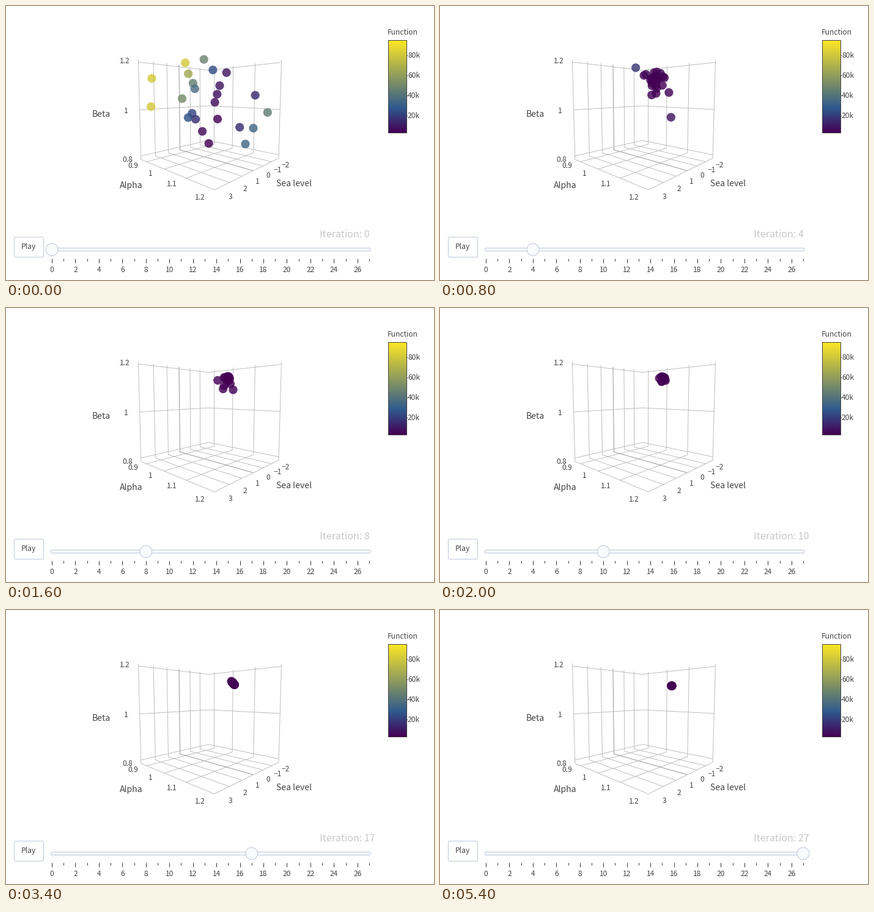
Write a matplotlib script that moves like this. It is 700 px wide and 450 px high and loops after 5.6 s.

```python
import matplotlib.pyplot as plt
import numpy as np
from matplotlib.animation import FuncAnimation
from matplotlib.collections import LineCollection
from matplotlib.colors import LinearSegmentedColormap
from matplotlib.patches import Circle, FancyBboxPatch, Rectangle

W, H, DPI = 700, 450, 100
PX = 72 / DPI
STEPS, INTERVAL, MEMBERS = 28, 200, 24
INK, EDGE, PALE = "#444444", "#bec8d9", "#f8fafc"

plt.rcParams["font.family"] = ["Noto Sans CJK JP", "DejaVu Sans"]
cmap = LinearSegmentedColormap.from_list(
    "cost", [(0, "#440154"), (0.27, "#2f5a8e"), (1, "#fde725")])

fig = plt.figure(figsize=(W / DPI, H / DPI), dpi=DPI, facecolor="white")
ax = fig.add_axes([0, 0, 1, 1])
ax.axis("off")

# Perspective camera: rows give x, y and depth from (u, v, w, 1)
CAMERA = np.array([[8.2, -165.5, -9.7, 331],
                   [-34.85, -36.3, -125.4, 225],
                   [-0.2394, -0.2511, -0.0293, 1]])


def project(u, v, w):
    """Unit box (u: alpha, v: sea level, w: beta) to stage pixels."""
    x, y, depth = CAMERA @ np.array([u, v, w, np.ones_like(u)], dtype=float)
    return np.array([x / depth, y / depth]).T


def alpha_at(a):
    return 0.106 + 2.98 * (a - 0.9)


def sea_at(s):
    return 0.494 + 0.169 * s


def beta_at(b):
    return 0.506 + 2.35 * (b - 1)


def label(x, y, s, size=12, color=INK, ha="center"):
    return ax.text(x, y + 0.365 * size, s, fontsize=size * PX, color=color,
                   ha=ha, va="baseline", zorder=6)


def line(pts, color="#b4b4b4", width=0.85, z=1):
    ax.add_collection(LineCollection([pts], colors=color,
                                     linewidths=width * PX, zorder=z))


def rounded(x, y, w, h, r, face):
    ax.add_patch(FancyBboxPatch((x + r, y + r), w - 2 * r, h - 2 * r,
                                boxstyle=f"round,pad={r}", fc=face, ec=EDGE,
                                lw=PX, zorder=2))


def draw_box():
    out = 1.14  # tick labels sit just outside the box
    for s in range(-2, 4):
        v = sea_at(s)
        line([project(0, v, 1), project(0, v, 0), project(1, v, 0)],
             "#858585" if s == 0 else "#b4b4b4")
        label(*project(out, v, 0), str(s).replace("-", "\u2212"))
    for a in (0.9, 1, 1.1, 1.2):
        u = alpha_at(a)
        line([project(u, 0, 1), project(u, 0, 0), project(u, 1, 0)])
        label(*project(u, out, 0), f"{a:g}")
    for b in (0.8, 1, 1.2):
        w = beta_at(b)
        line([project(0, 1, w), project(0, 0, w), project(1, 0, w)])
        label(*project(0, out, w), f"{b:g}")
    label(156, 176.5, "Beta", 14)
    label(205, 294, "Alpha", 14)
    label(471, 291, "Sea level", 14)


def draw_colorbar():
    ramp = np.linspace(1, 0, 256)[:, None]
    ax.imshow(ramp, cmap=cmap, vmin=0, vmax=1, extent=(625, 655, 208, 56),
              aspect="auto", zorder=2)
    ax.add_patch(Rectangle((624.5, 55.5), 30.5, 152.5, fc="none",
                           ec="#444444", lw=PX, zorder=3))
    label(624, 43, "Function", ha="left")
    for i in range(1, 5):
        y = 212.5 - 33 * i
        line([(655, y), (657, y)], "#444444", z=3)
        label(657, y, f"{20 * i}k", ha="left")


def slot(k):
    return 75 + 19.22 * k


def draw_controls():
    rounded(13.5, 379.5, 48, 33, 2.5, "white")
    label(36.5, 395, "Play")
    rounded(73.5, 397.5, 522.5, 5, 2.4, PALE)
    for k in range(STEPS):
        x = np.floor(slot(k) - 0.5) + 0.5
        line([(x, 415), (x, 419 if k % 2 else 422)], "#333333", 1)
        if k % 2 == 0:
            label(slot(k), 433, str(k))


def best(k):
    """Drift of the best known spot towards the optimum."""
    return np.array([379.5 - 11.5 * ((27 - k) / 17) ** 1.5,
                     124.7 - 12 / (1 + np.exp((k - 13) / 2))])


def evolve():
    """Latin hypercube start; members hop towards the best spot."""
    rng = np.random.default_rng(12)
    u, v, w = [(rng.permutation(MEMBERS) + rng.random(MEMBERS)) / MEMBERS
               for _ in range(3)]
    pos = project(0.1 + 0.85 * u, 0.1 + 0.9 * v, 0.2 + 0.78 * w)
    slope = (380 - pos[:, 0]) - 0.5 * (pos[:, 1] - 125)
    cost = np.minimum(0.85, (slope / 108) ** 2)
    history = [(pos, cost)]
    for k in range(1, STEPS):
        # costly members improve sooner, and hits get likelier with time
        hit = rng.random(MEMBERS) < 0.4 + 0.02 * k + 0.5 * cost
        shrink = rng.uniform(0.2, 0.9, MEMBERS)
        hop = best(k) + (pos - best(k)) * shrink[:, None]
        pos = np.where(hit[:, None], hop, pos)
        cost = np.where(hit, cost * shrink ** 3, cost)
        history.append((pos, cost))
    return history


draw_box()
draw_colorbar()
draw_controls()

history = evolve()
dots = ax.scatter(*history[0][0].T, s=(14.2 * PX) ** 2, linewidths=0, zorder=5)
grip = Circle((slot(0), 400), 10, fc=PALE, ec=EDGE, lw=PX, zorder=5)
ax.add_patch(grip)
counter = label(513, 374.5, "", 16, "#c8c8c8", "left")


def update(k):
    pos, cost = history[k]
    dots.set_offsets(pos)
    dots.set_facecolors(cmap(cost, alpha=0.82))
    grip.set_center((slot(k), 400))
    counter.set_text(f"Iteration: {k}")
    return dots, grip, counter


ax.set_xlim(0, W)
ax.set_ylim(H, 0)
anim = FuncAnimation(fig, update, frames=STEPS, interval=INTERVAL,
                     repeat=True, repeat_delay=0)
plt.show()
```
